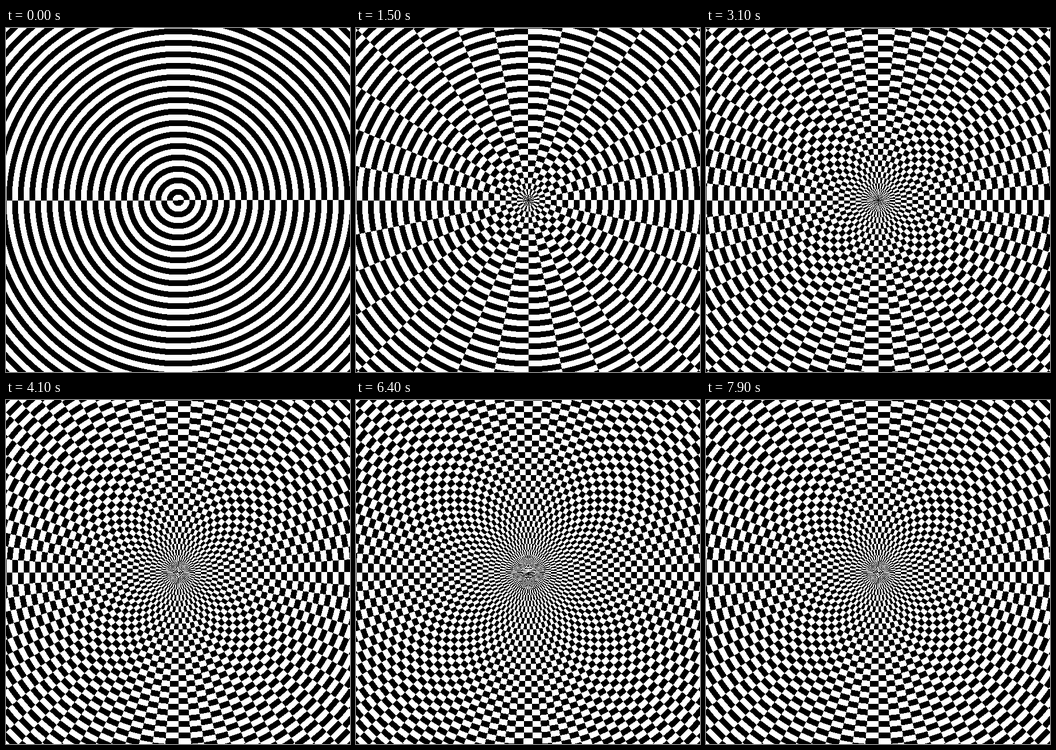
An HTML page with a canvas that plays this animation: 600x600 px, repeating every 8 s.

```html
<!DOCTYPE html>
<html lang="en">
<head>
<meta charset="utf-8">
<title>Polar checkerboard</title>
<style>
  html, body { margin: 0; width: 100%; height: 100%; overflow: hidden; background: #fff; }
  canvas { display: block; width: 600px; height: 600px; }
</style>
</head>
<body>
<canvas id="stage" width="600" height="600"></canvas>
<script>
const SIZE = 600, CENTER = 300, RING = 10;
const STEP_MS = 100, STEPS = 80, PEAK = 60;
const BLACK = 0xff000000, WHITE = 0xffffffff;

const ctx = document.getElementById('stage').getContext('2d');
const image = ctx.createImageData(SIZE, SIZE);
const pixels = new Uint32Array(image.data.buffer);

// Polar coordinates of each pixel: angle in half turns, and ring index
const angle = new Float64Array(SIZE * SIZE);
const ring = new Uint8Array(SIZE * SIZE);
for (let i = 0; i < pixels.length; i++) {
  const dx = i % SIZE - CENTER;
  const dy = Math.floor(i / SIZE) - CENTER;
  angle[i] = Math.atan2(dy, dx) / Math.PI;
  ring[i] = Math.floor(Math.hypot(dx, dy) / RING);
}

// Sectors per half turn: grow by one each step up to the peak, then shrink
function sectorsAt(step) {
  return Math.min(step + 1, PEAK, 2 * PEAK + 1 - step);
}

function draw(sectors) {
  for (let i = 0; i < pixels.length; i++) {
    const odd = (Math.floor(angle[i] * sectors) + ring[i]) & 1;
    pixels[i] = odd ? WHITE : BLACK;
  }
  ctx.putImageData(image, 0, 0);
}

let shown = 0;
function tick() {
  const step = Math.floor(performance.now() / STEP_MS) % STEPS;
  const sectors = sectorsAt(step);
  if (sectors !== shown) draw(shown = sectors);
  requestAnimationFrame(tick);
}
tick();
</script>
</body>
</html>
```
